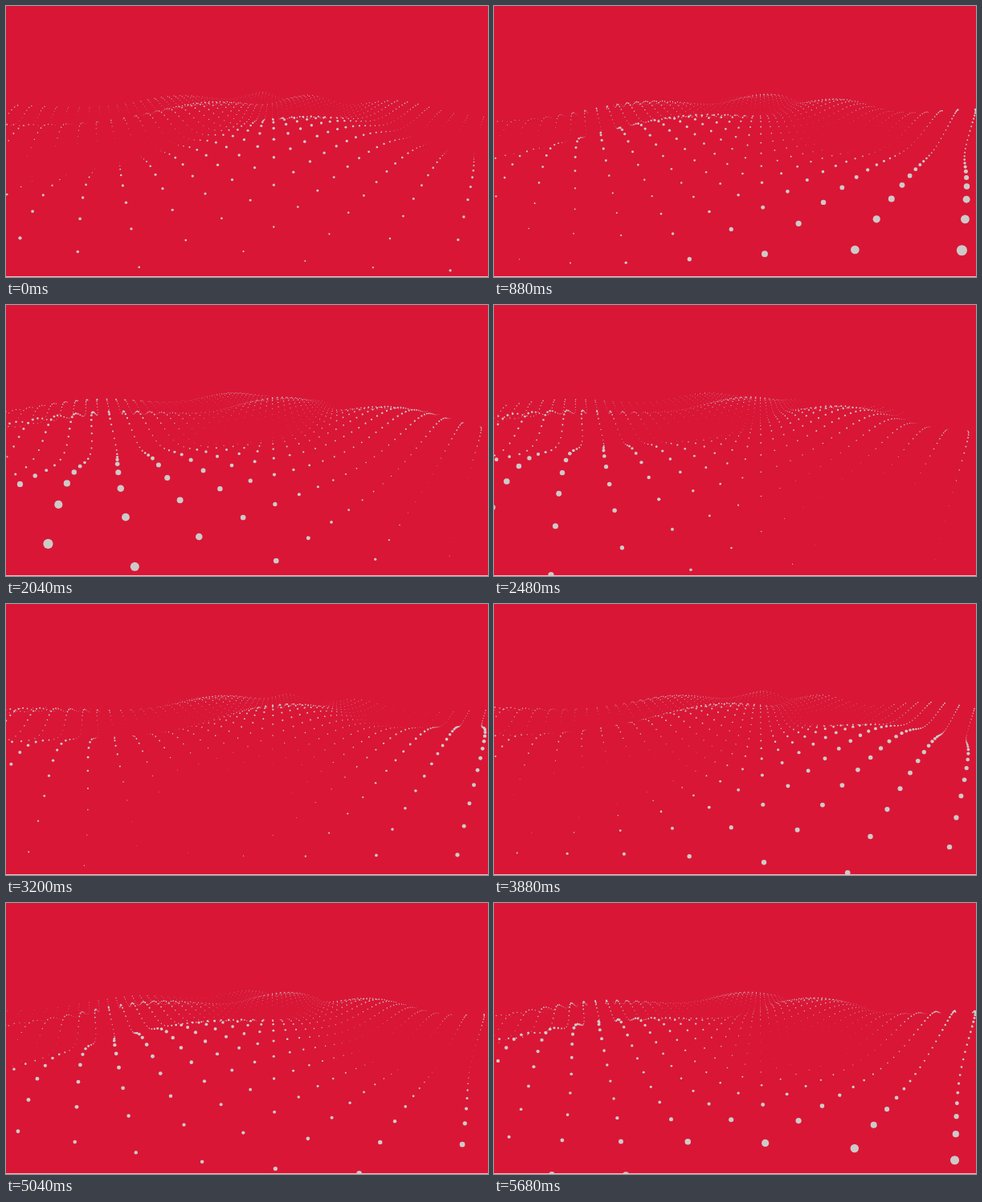
An HTML page with a canvas for the animation above (5720 ms loop, 600 by 338 pixels).

```html
<!DOCTYPE html>
<html lang="en">
<head>
<meta charset="utf-8">
<title>Dot waves</title>
<style>
  html, body { margin: 0; width: 100%; height: 100%; overflow: hidden; background: #d91636; }
  canvas { display: block; }
</style>
</head>
<body>
<canvas id="stage" width="600" height="338"></canvas>
<script>
const WIDTH = 600, HEIGHT = 338;
const LOOP = 5720, STEP = 40;
const SPEED = 5.33;            // wave travel in grid cells per second
const FOCAL = 220;
const PITCH = 18.82 * Math.PI / 180;
const YAW = 37.48 * Math.PI / 180;
const EYE = { u: 2.82, v: 2.513, height: 3.29 };
const GRID = { uMin: -16, uMax: 26, vMin: -6, vMax: 29 };
const DOT_RADIUS = 0.04;

const cosP = Math.cos(PITCH), sinP = Math.sin(PITCH);
const cosY = Math.cos(YAW), sinY = Math.sin(YAW);
const ctx = document.getElementById('stage').getContext('2d');

function waveHeight(u, v, shift) {
  return 0.5 * Math.cos(0.3 * (u - 6.4 + shift)) - 0.5 * Math.cos(0.5 * (v + 2.3 - shift));
}

// Grid cell and height to screen position and pixels per cell.
function project(u, v, y) {
  const du = u + EYE.u, dv = v + EYE.v;
  const right = du * cosY - dv * sinY;
  const forward = du * sinY + dv * cosY;
  const drop = EYE.height - y;
  const depth = forward * cosP + drop * sinP;
  const scale = FOCAL / depth;
  return {
    x: WIDTH / 2 + right * scale,
    y: HEIGHT / 2 + (drop * cosP - forward * sinP) * scale,
    scale, depth
  };
}

function draw(time) {
  const shift = SPEED * time / 1000;
  ctx.fillStyle = '#d91636';
  ctx.fillRect(0, 0, WIDTH, HEIGHT);
  ctx.fillStyle = '#cccac8';
  for (let u = GRID.uMin; u <= GRID.uMax; u++) {
    for (let v = GRID.vMin; v <= GRID.vMax; v++) {
      const y = waveHeight(u, v, shift);
      const p = project(u, v, y);
      if (p.depth < 0.5 || p.x < -20 || p.x > WIDTH + 20 || p.y > HEIGHT + 20) continue;
      ctx.beginPath();
      ctx.arc(p.x, p.y, DOT_RADIUS * (1 + y) * p.scale, 0, 2 * Math.PI);
      ctx.fill();
    }
  }
  // pale hairline along the bottom edge
  ctx.fillStyle = '#f3b9c3';
  ctx.fillRect(0, HEIGHT - 1, WIDTH, 1);
}

const start = performance.now();
function tick() {
  const elapsed = (performance.now() - start) % LOOP;
  draw(Math.floor(elapsed / STEP) * STEP);
  requestAnimationFrame(tick);
}
tick();
</script>
</body>
</html>
```
